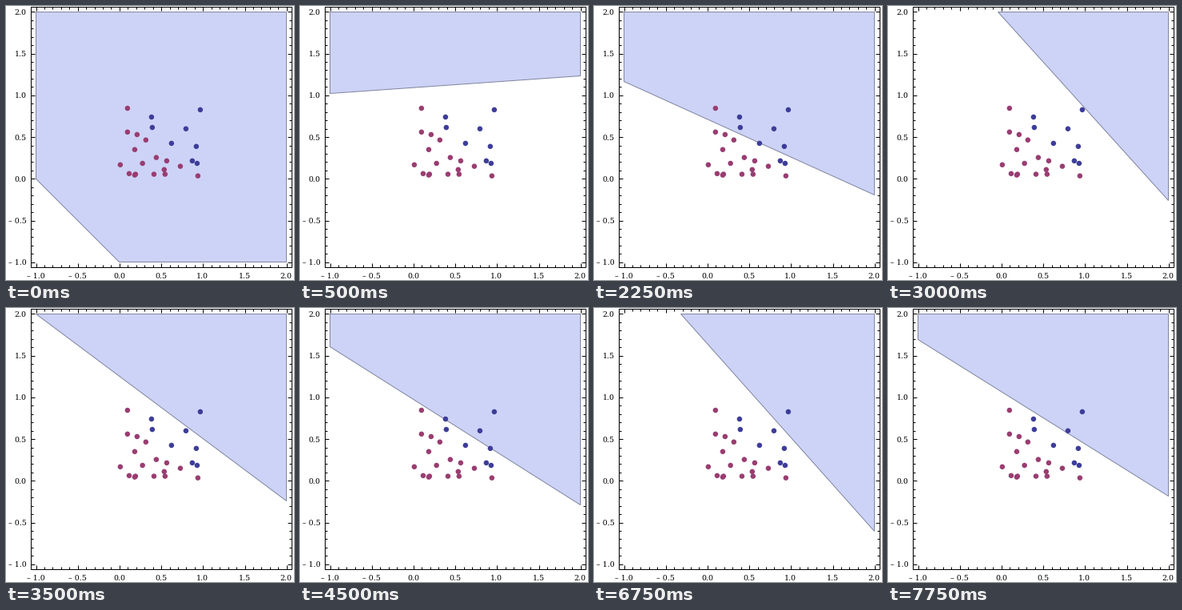
These frames come from a looping animation (360 by 343 pixels, 8000 ms). A matplotlib script:

```python
import math

import matplotlib.pyplot as plt
import numpy as np
from matplotlib.animation import FuncAnimation
from matplotlib.collections import LineCollection
from matplotlib.patches import Polygon, Rectangle

W, H, DPI = 360, 343, 64
PX = 72 / DPI  # points per pixel
LEFT, TOP, RIGHT, BOTTOM = 30.5, 0.5, 356.5, 326.5

# The data set; a point is blue when x + y > 1, otherwise red.
POINTS = np.array([
    (.10, .84), (.10, .555), (.215, .525), (.32, .46), (.187, .345),
    (.014, .163), (.28, .18), (.445, .25), (.57, .21), (.54, .105),
    (.55, .05), (.417, .05), (.12, .057), (.187, .04), (.196, .05),
    (.733, .145), (.943, .03), (.388, .735), (.397, .61), (.972, .822),
    (.80, .594), (.627, .42), (.924, .383), (.876, .21), (.934, .18)])
LABEL = np.where(POINTS.sum(axis=1) > 1, 1, -1)
INPUTS = np.column_stack([np.ones(len(POINTS)), POINTS])

# Key boundaries: step, bias, height at x = -1 and at x = 2.
KEYS = [(0, 1, 0, -3), (5, -2, 1.53, 1.045), (9, -2, 1.17, -.195),
        (14, -3, 2, -.243), (18, -3, 1.61, -.285), (23, -4, 2.333, -.125),
        (31, -4, 1.69, -.18)]


def to_px(p):
    p = np.asarray(p, float)
    return np.column_stack([141.4 + 104.4 * p[:, 0], 215.8 - 104.5 * p[:, 1]])


def weights_from_line(bias, y_left, y_right):
    slope = (y_right - y_left) / 3
    v = -bias / (y_left + slope)
    return np.array([bias, -slope * v, v])


def learn(w, goal):
    """Perceptron update with the misclassified point that leads nearest to goal."""
    wrong = LABEL * (INPUTS @ w) < 0
    if not wrong.any():
        return w
    options = w + LABEL[wrong, None] * INPUTS[wrong]
    return min(options, key=lambda o: np.sum((o - goal) ** 2))


def weight_path():
    path = [weights_from_line(*KEYS[0][1:])]
    for step, *line in KEYS[1:]:
        goal = weights_from_line(*line)
        while len(path) < step:
            path.append(learn(path[-1], goal))
        path.append(goal)
    return path


def positive_region(w):
    """Clip the square [-1, 2] x [-1, 2] to w0 + w1 x + w2 y >= 0."""
    square = np.array([(-1, -1), (2, -1), (2, 2), (-1, 2)], float)
    side = w[0] + square @ w[1:]
    out = []
    for i in range(4):
        j = (i + 1) % 4
        if side[i] >= 0:
            out.append(square[i])
        if side[i] * side[j] < 0:
            t = side[i] / (side[i] - side[j])
            out.append(square[i] + t * (square[j] - square[i]))
    return to_px(out)


def pixel_centre(v):
    return math.floor(v) + .5


def tick_lines():
    lines = []
    for k in range(-10, 21):
        size = 5 if k % 5 == 0 else 3
        x, y = map(pixel_centre, to_px([(k / 10, k / 10)])[0])
        lines += [[(x, BOTTOM), (x, BOTTOM - size)], [(x, TOP), (x, TOP + size)],
                  [(LEFT, y), (LEFT + size, y)], [(RIGHT, y), (RIGHT - size, y)]]
    return lines


def draw_labels(ax):
    style = dict(family="DejaVu Serif", size=9.5 * PX, color="black",
                 va="baseline")
    for k in range(-2, 5):
        value = k / 2
        text = f"{abs(value):.1f}"
        if value < 0:
            text = "\u2013 " + text
        x, y = to_px([(value, value)])[0]
        ax.text(x, 341, text, ha="center", **style)
        ax.text(25.8, y + 4, text, ha="right", **style)


fig = plt.figure(figsize=(W / DPI, H / DPI), dpi=DPI, facecolor="white")
ax = fig.add_axes([0, 0, 1, 1])
ax.set_xlim(0, W)
ax.set_ylim(H, 0)
ax.axis("off")

path = weight_path()
region = Polygon(positive_region(path[0]), closed=True, facecolor="#cdd3f6",
                 edgecolor="#80869f", linewidth=PX, zorder=1)
ax.add_patch(region)
ax.scatter(*to_px(POINTS).T, s=(6.5 * PX) ** 2, linewidths=0, zorder=2,
           c=np.where(LABEL > 0, "#3d3d99", "#993d71"))
ax.add_patch(Rectangle((LEFT, TOP), RIGHT - LEFT, BOTTOM - TOP, fill=False,
                       edgecolor="black", linewidth=PX, zorder=3))
ax.add_collection(LineCollection(tick_lines(), colors="black",
                                 linewidths=PX, zorder=3))
draw_labels(ax)


def draw(i):
    region.set_xy(positive_region(path[i]))
    return (region,)


anim = FuncAnimation(fig, draw, frames=len(path), interval=250,
                     repeat=True, repeat_delay=0, blit=False)
plt.show()
```
